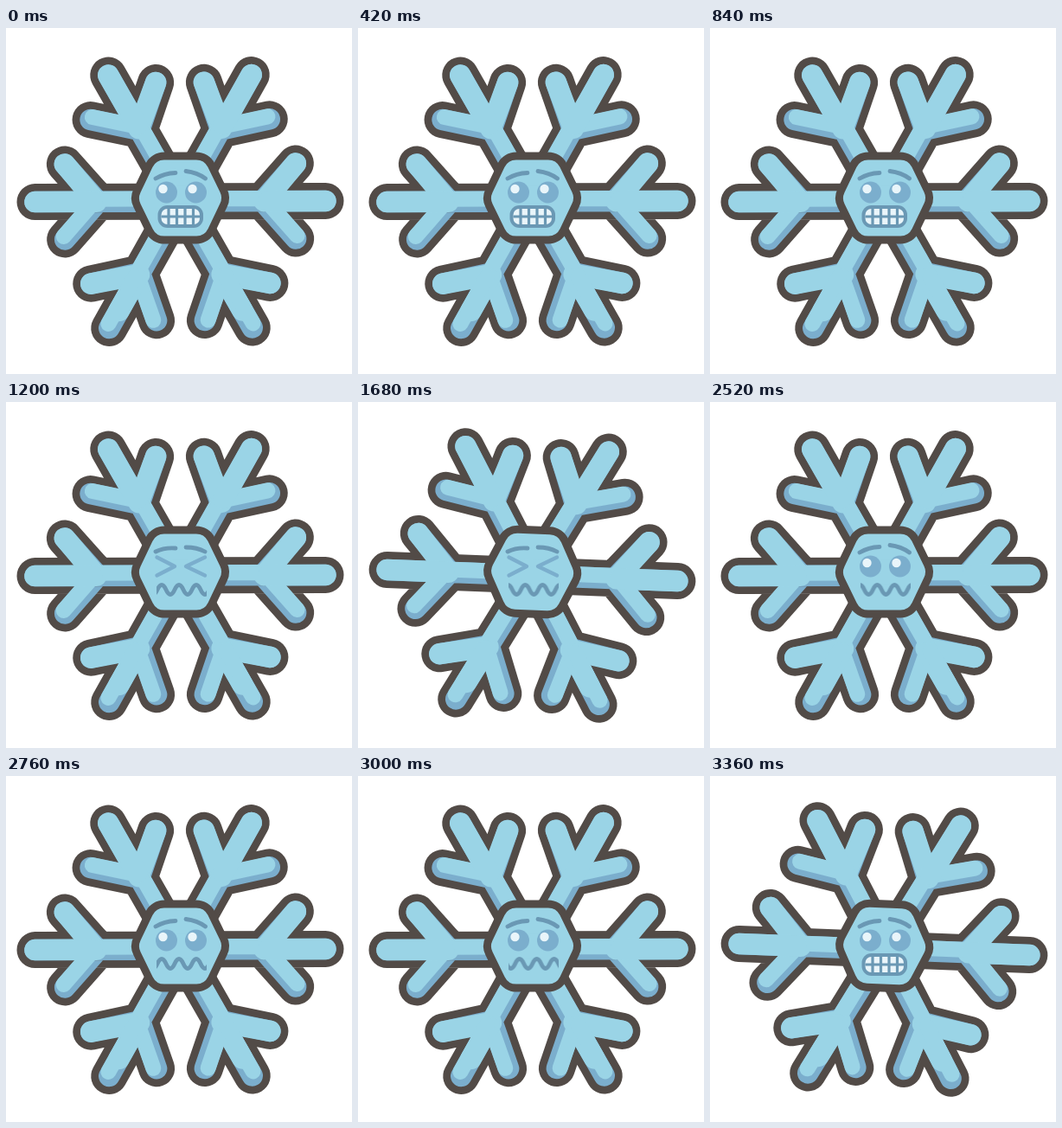
These frames come from a looping animation (400x400 px, 3480 ms). An HTML page without scripts:

```html
<!DOCTYPE html>
<html lang="en">
<head>
<meta charset="utf-8">
<title>Shivering snowflake</title>
<style>
  @property --beat { syntax: "<integer>"; inherits: false; initial-value: 0; }

  html, body { margin: 0; width: 100%; height: 100%; overflow: hidden; background: #fff; }
  svg {
    --dark: #524b47; --ice: #9ad4e6; --shadow: #7baecd; --ink: #6a98b4; --white: #e9f5fa;
    --wave: 20px;
    display: block; width: 100%; height: 100%;
  }
  svg * { stroke-linecap: round; stroke-linejoin: round; }

  .line { fill: none; }
  .edge { stroke: var(--dark); stroke-width: 42px; }
  .shade { stroke: var(--shadow); stroke-width: 24.5px; }
  .light { stroke: var(--ice); stroke-width: 24.5px; }
  .lit { stroke-width: 18px; }
  .rim { fill: var(--dark); stroke: var(--dark); stroke-width: 48px; }
  .core { fill: var(--ice); stroke: var(--ice); stroke-width: 30px; }
  .ink { stroke: var(--ink); stroke-width: 4.8px; }
  .squint { stroke: var(--shadow); stroke-width: 4.4px; }
  .eye { fill: var(--shadow); }
  .glint, .tooth { fill: var(--white); }

  .body, .face, .wave { animation: 3480ms step-end infinite; }

  /* every beat tips the body to its other side */
  .body {
    animation-name: shiver;
    transform-origin: 201.5px 200.5px;
    transform: rotate(calc(1deg - 1.2deg * cos(180deg * var(--beat))));
  }
  .grimace { animation-name: grimace; }
  .worried { animation-name: worried; }
  .squeeze { animation-name: squeeze; }
  .stare { animation-name: stare; }
  .wave { animation-name: ripple; }

  /* 210 ms beats while grimacing, 150 ms beats in between */
  @keyframes shiver {
    0% { --beat: 0; animation-timing-function: steps(5); }
    30.17% { --beat: 5; }
    34.48% { --beat: 6; animation-timing-function: steps(13); }
    90.5% { --beat: 19; }
    90.51% { --beat: 20; }
    96.55%, 100% { --beat: 21; }
  }
  @keyframes grimace { 0%, 90.51%, 100% { opacity: 1; } 34.48% { opacity: 0; } }
  @keyframes worried { 0%, 90.51%, 100% { opacity: 0; } 34.48% { opacity: 1; } }
  @keyframes squeeze { 0%, 68.96%, 100% { opacity: 0; } 34.48% { opacity: 1; } }
  @keyframes stare { 0%, 90.51%, 100% { opacity: 0; } 68.96% { opacity: 1; } }

  /* the mouth slides a third of a wave every 120 ms */
  @keyframes ripple {
    0%, 34.48% { transform: none; animation-timing-function: steps(10); }
    68.95% { transform: translateX(calc(var(--wave) * -10 / 3)); }
    68.96% { transform: none; animation-timing-function: steps(6); }
    89.65%, 100% { transform: translateX(calc(var(--wave) * -2)); }
  }
</style>
</head>
<body>
<svg viewBox="0 0 400 400">
  <defs>
    <path id="limb" d="M40 0H168M133.500 -43.500L95 0L133.500 43.500"/>
    <g id="sheen">
      <path d="M97 0L133.500 -43.500"/>
      <path class="lit" d="M40 -3.200H97L135 40"/>
    </g>
    <g id="arm" class="line">
      <use href="#limb" class="edge"/>
      <use href="#limb" class="shade"/>
      <g class="light"><use href="#sheen"/><path d="M102 0H168"/></g>
    </g>
    <g id="lowArm" class="line">
      <use href="#limb" class="edge"/>
      <use href="#limb" class="shade"/>
      <g class="light"><use href="#sheen"/><path d="M102 0H145"/><path class="lit" d="M102 -3.200H164"/></g>
    </g>
    <g id="half">
      <use href="#arm" transform="rotate(-60.500)"/>
      <use href="#arm"/>
      <use href="#lowArm" transform="rotate(60.500)"/>
    </g>
    <polygon id="hex" points="183,167.500 220,167.500 234,196.500 220,225.500 183,225.500 169,196.500"/>
    <g id="eyes">
      <g id="leftEye">
        <circle class="eye" cx="185.500" cy="190" r="12.500"/>
        <circle class="glint" cx="181.500" cy="186" r="5.200"/>
      </g>
      <use href="#leftEye" x="34"/>
    </g>
    <path id="worryBrows" d="M173 174Q183 168 196 167.500M208 165.500Q221 167 230.500 174"/>
    <clipPath id="teeth"><rect x="179.500" y="209" width="44.500" height="18" rx="7"/></clipPath>
    <clipPath id="lips"><rect x="174" y="204" width="58" height="26"/></clipPath>
  </defs>

  <g class="body">
    <g transform="translate(201.500 200.500)">
      <use href="#half"/>
      <use href="#half" transform="scale(-1 1)"/>
    </g>
    <use href="#hex" class="rim"/>
    <use href="#hex" class="core"/>
  </g>

  <g class="face grimace">
    <use href="#worryBrows" class="line ink"/>
    <use href="#eyes"/>
    <rect x="175.500" y="205" width="52.500" height="26" rx="11" fill="var(--ink)"/>
    <g clip-path="url(#teeth)">
      <rect class="tooth" x="179" y="209" width="46" height="18"/>
      <path d="M188 207v22m9.500 -22v22m9.500 -22v22m9.500 -22v22M178 218h48" stroke="var(--ink)" stroke-width="3.200"/>
    </g>
  </g>

  <g class="face squeeze">
    <path class="line ink" d="M173 173Q183 168 196 169M208 168Q221 168 230 173"/>
    <path class="line squint" d="M174.500 179.500L195 190L174.500 200.500M230 179.500L208 190L230 200.500"/>
  </g>

  <g class="face stare">
    <use href="#worryBrows" class="line ink"/>
    <use href="#eyes"/>
  </g>

  <g class="face worried" clip-path="url(#lips)">
    <path class="wave line ink" d="M155 222q5 0 10 -5t10 -5t10 5t10 5" visibility="hidden"/>
    <path class="wave line ink" d="M165 217Q170 228 175 217T185 217T195 217T205 217T215 217T225 217T235 217T245 217T255 217T265 217T275 217T285 217T295 217T305 217"/>
  </g>
</svg>
</body>
</html>
```
